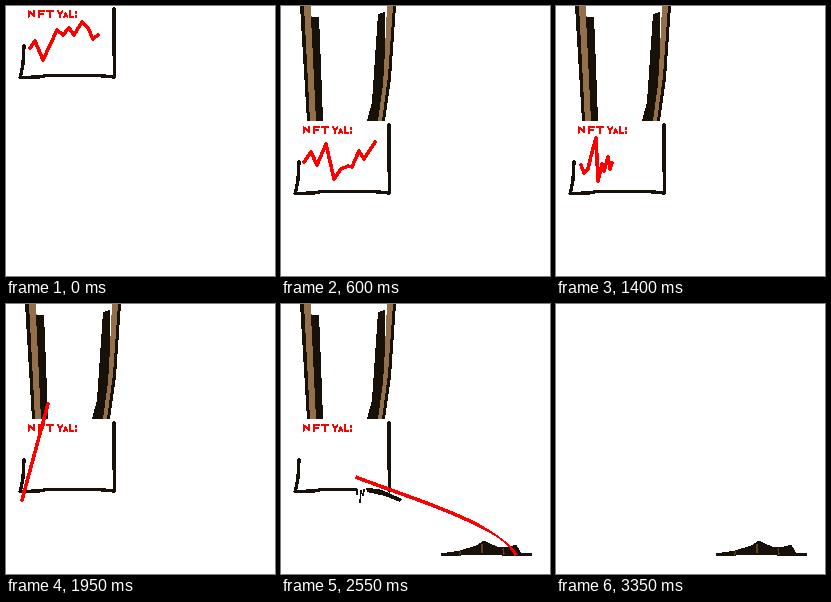
An HTML page that plays this animation: 269x270 px, repeating every 3.85 s.

```html
<!DOCTYPE html>
<html lang="en">
<head>
<meta charset="utf-8">
<title>NFT VaL</title>
<style>
html, body { margin: 0; width: 100%; height: 100%; overflow: hidden; background: #fff; }
svg { display: block; width: 100vw; height: 100vh; }
.ink, .red { fill: none; stroke-linecap: round; stroke-linejoin: round; }
.ink { stroke: #17110a; stroke-width: 3.4; }
.red { stroke: #f00; stroke-width: 3.6; }
.dark { fill: #17110a; }
.wood { fill: #94704a; }
.speck { fill: none; stroke: #5e4220; stroke-width: 1.4; }
</style>
</head>
<body>
<svg viewBox="0 0 269 270" preserveAspectRatio="none" shape-rendering="crispEdges">
  <g id="board">
    <path class="dark" d="M19 -20V0L26 115H33L26 0V-20Z"/>
    <path class="wood" d="M23 -20V0L29 115H36L30 0V-20Z"/>
    <path class="dark" d="M30 11H38L40 60 42 115H35Z"/>
    <path class="dark" d="M110 -20V0L106 66 100 115H104L110 72 115 0V-20Z"/>
    <path class="wood" d="M106 -20V0L103 64 96 115H101L107 70 112 0V-20Z"/>
    <path class="dark" d="M97 8L104 6 104 45 102 78 97 115H86L91 96Z"/>
    <path class="ink" d="M18 156L17 174 14.500 187M108 119V150L108.500 187"/>
    <path class="ink" id="floor"/>
    <g id="shards">
      <path class="dark" d="M85 184L98 185 108 189 121 195 119 198 104 192 86 188Z"/>
      <path class="ink" style="stroke-width:1.6" d="M76 186V190M80 187L79 198M83 186L82 191"/>
    </g>
    <path class="red" role="img" aria-label="NFT VaL:" style="stroke-width:2" d="M22.500 127V121L28 126V120.500M33 127V121H38M33 124H37M41 121H47M44 121V127M52 121L54 124.500 56.500 121M54 124.500V127M58 127L59.500 123.500 61.500 127M59 126H61M64 121V127H67M70 121.500V123M70 125.500V127"/>
    <path class="red" id="graph"/>
  </g>
  <g id="mound" transform="translate(0 .5)">
    <path class="dark" d="M160 249L179 246 195 241 203 236 211 240 219 243 228 242 235 240 240 248 251 248V251H221L195 250 180 251H160Z"/>
    <path class="speck" d="M201 239V248M222 244L223 250M180 247L178 251"/>
  </g>
  <path id="whip" fill="#f00"/>
  <g id="dust"></g>
</svg>
<script>
const LOOP = 3850, BREAK = 2050, HIT = 2150;
const $ = id => document.getElementById(id);
const clamp = k => Math.max(0, Math.min(1, k));
const lerp = (a, b, k) => a + (b - a) * k;
const mix = (p, q, k) => [lerp(p[0], q[0], k), lerp(p[1], q[1], k)];
const show = (id, on) => $(id).setAttribute('visibility', on ? 'visible' : 'hidden');
const draw = (id, d) => $(id).setAttribute('d', d);
const points = s => s.split(' ').map(p => p.split(',').map(Number));
const noise = n => Math.sin(n * 127.1) * 43758.5453 % 1;

// Key shapes of the chart: rising, falling, pulse, and one straight slash
const rise = points('24,158 29,151 37,170 51,140 57,145 63,138 68,145 76,132 82,138 87,149 92,145');
const dip = points('23,156 30,146 36,159 45,138 53,173 60,163 67,160 71,161 78,145 83,153 94,136');
const pulse = points('25,159 28,167 32,163 35,150 40,132 42,175 46,158 48,165 52,151 54,163 56,157');
const slash = pulse.map((p, i) => mix([42, 100], [16, 196], i / 10));

// The drawing is held: slow steps at first, quick ones later
function hold(t) {
  if (t < 1400) return Math.floor(t / 200) * 200;
  if (t < 1650) return 1400;
  return Math.min(3350, Math.floor((t - 50) / 100) * 100 + 50);
}

function chart(t) {
  const [a, b, k] = t < 600 ? [rise, dip, t / 600]
    : t < 1400 ? [dip, pulse, (t - 600) / 800]
    : [pulse, slash, clamp((t - 1400) / 550)];
  const shake = 20 * k * (1 - k);
  return a.map((p, i) => {
    const [x, y] = mix(p, b[i], k);
    return [x, y + shake * noise(i + t)];
  });
}

// Tapered ribbon along a cubic that shoots out, then curls into the mound
function ribbon(t) {
  const shot = clamp((t - 1950) / 200);
  const pull = Math.max(0, (t - 2250) / 700);
  const curl = Math.min(1, pull) ** 1.5;
  const x = 33 + 125 * pull ** 1.3;
  const back = mix([42, 100], [x, 152 + (x - 33) * 0.504], shot);
  const end = mix([16, 196], mix([238, 252], [228, 250], curl), shot);
  const bend = curl * (end[0] - back[0]) / 70;
  const c1 = mix(back, end, 1 / 3), c2 = mix(back, end, 2 / 3);
  c1[0] += 9 * bend; c1[1] -= 5 * bend;
  c2[0] += 57 * bend; c2[1] -= 8 * bend;
  const at = u => {
    const m = mix(c1, c2, u);
    return mix(mix(mix(back, c1, u), m, u), mix(m, mix(c2, end, u), u), u);
  };
  const left = [], right = [];
  for (let i = 0; i <= 40; i++) {
    const u = i / 40, [px, py] = at(u), [qx, qy] = at(u + 0.01);
    const len = Math.hypot(qx - px, qy - py) || 1;
    const thin = clamp(1 - Math.abs(u - 0.82) * 5) * (1 - curl);
    const w = 1.8 * (1 - 0.75 * thin) / len;
    const nx = (py - qy) * w, ny = (qx - px) * w;
    left.push([px + nx, py + ny]);
    right.unshift([px - nx, py - ny]);
  }
  return 'M' + left.concat(right).join(' ') + 'Z';
}

function dust(t) {
  const count = t === HIT ? 9 : t === HIT + 100 ? 1 : 0;
  let s = '';
  for (let i = 0; i < count; i++) {
    const a = 0.2 + i * 0.3, r = 22 + 5 * noise(i);
    s += `<rect class="${i % 3 ? 'dark' : 'wood'}" x="${211 + r * 1.3 * Math.cos(a)}" y="${241 - r * Math.sin(a)}" width="3" height="3"/>`;
  }
  return s;
}

function render(time) {
  const t = hold(time), broken = t >= BREAK;
  const drop = -116 * clamp(1 - t / 600) ** 1.9;
  const lift = -200 * clamp((t - 2750) / 600) ** 3.8;
  const drift = t > 2750 ? -1.5 : 0;
  $('board').setAttribute('transform', `translate(${drift} ${drop + lift})`);
  draw('floor', 'M14 187.500L33 187 40 185.500 75 185.500' + (broken ? '' : 'L92 185.500 108 187'));
  show('shards', broken);
  show('graph', !broken);
  if (!broken) draw('graph', 'M' + chart(t).join(' '));
  show('whip', broken && t < 3350);
  if (broken) draw('whip', ribbon(t));
  show('mound', t >= HIT);
  $('dust').innerHTML = dust(t);
}

let start = null;
function tick(now) {
  if (start === null) start = now;
  render((now - start) % LOOP);
  requestAnimationFrame(tick);
}
render(0);
requestAnimationFrame(tick);
</script>
</body>
</html>
```
